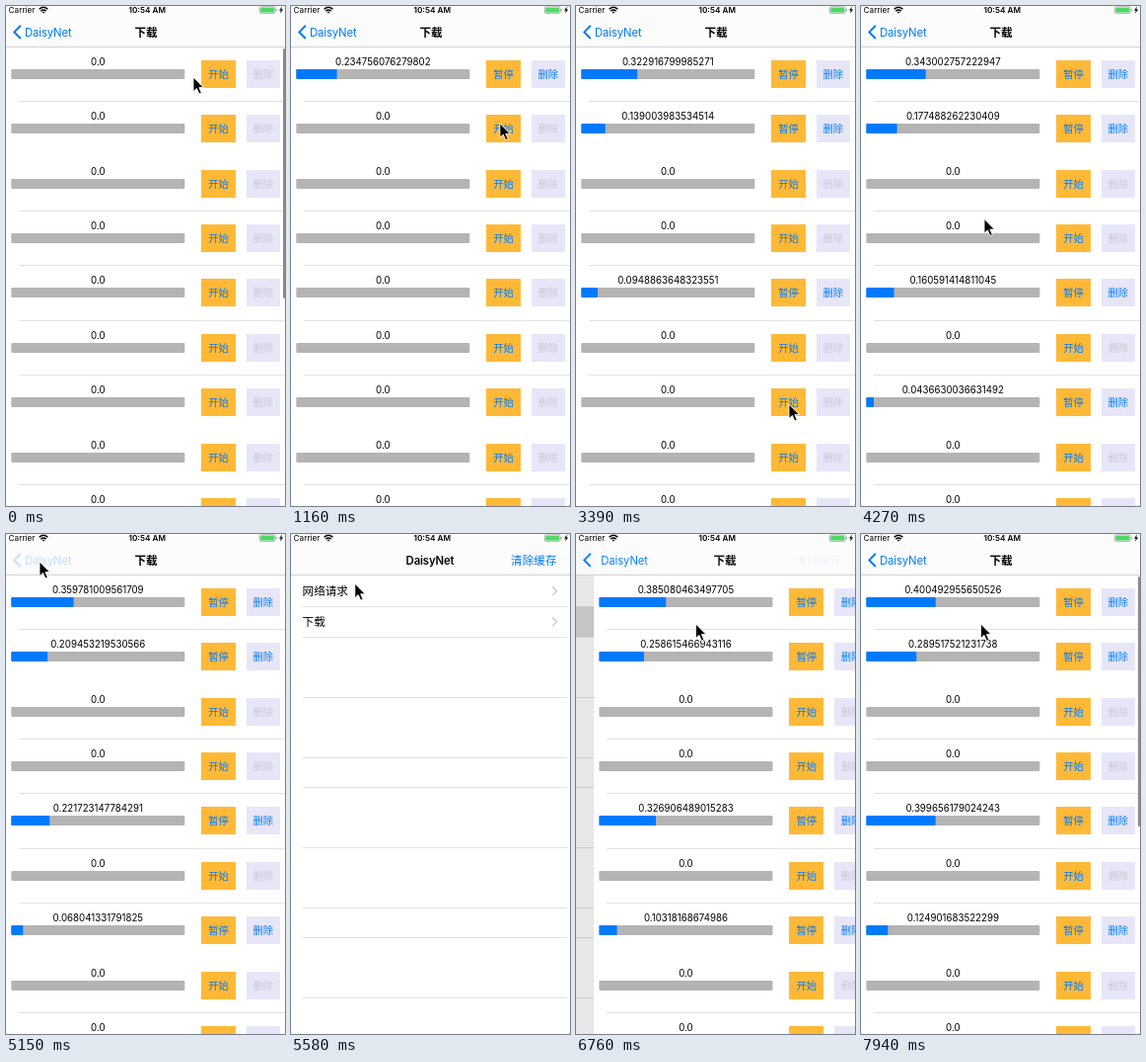
Recreate the animation shown at these times as an HTML page. Size 283 px wide and 506 px high, loop 8 s.

```html
<!DOCTYPE html>
<html lang="zh-CN">
<head>
<meta charset="utf-8">
<title>下载</title>
<style>
html, body { margin: 0; width: 100%; height: 100%; overflow: hidden; background: #fff; }
svg { display: block; width: 100vw; height: 100vh; }
text { font-family: Inter, "Noto Sans CJK SC", "Noto Sans CJK", sans-serif; font-size: 11.6px; fill: #000; white-space: pre; }
.mid { text-anchor: middle; }
.bold { font-weight: 600; }
.latin { font-size: 11.3px; letter-spacing: -.1px; }
.status { font-size: 8.2px; }
.value { font-size: 9.7px; }
.btn { font-size: 10.3px; }
.blue { fill: #007aff; }
.crisp { shape-rendering: crispEdges; }
.line { fill: #e2e2e3; shape-rendering: crispEdges; }
.arrow { fill: none; stroke: #c7c7cc; stroke-width: 1.3; }
</style>
</head>
<body>
<svg viewBox="0 0 283 506">
  <g id="home">
    <rect width="283" height="506" fill="#fff"/>
    <rect id="pressed" y="74" width="283" height="30.3" fill="#d9d9d9"/>
    <g id="homeLines"></g>
    <text x="12.4" y="62.3">网络请求</text>
    <text x="12.4" y="93.3">下载</text>
    <path class="arrow" d="M266 53.5l4.3 4.3-4.3 4.3M266 84.5l4.3 4.3-4.3 4.3"/>
    <rect id="dim" width="283" height="506"/>
  </g>
  <g id="page">
    <rect width="283" height="506" fill="#fff"/>
    <g id="rows"></g>
    <rect id="scroll" x="281" y="43" width="2" height="253" rx="1" fill="#8c8c8f"/>
  </g>
  <g id="nav">
    <rect width="283" height="41" fill="#fcfcfc" fill-opacity=".88"/>
    <rect class="line" y="41" width="283" height="1" style="fill:#d3d3d4"/>
    <text class="status" x="2.6" y="7">Carrier</text>
    <g fill="none" stroke="#000" stroke-width="1.5">
      <path d="M33.6 3.3q4.4-4 8.8 0M35.3 5.1q2.7-2.3 5.4 0"/>
      <path d="M37 6.2h2L38 7.3z" stroke-width=".8"/>
    </g>
    <text class="status bold mid" x="143.2" y="7">10:54 AM</text>
    <rect x="257.4" y=".9" width="15.8" height="6.4" rx="1.4" fill="none" stroke="#8a8a8a" stroke-width=".7"/>
    <rect x="258.3" y="1.8" width="14" height="4.6" rx=".7" fill="#4cd964"/>
    <path d="M274.1 3v2.2q1-.3 1-1.1t-1-1.1z" fill="#8a8a8a"/>
    <path d="M280 .6l-3 4h1.8l-.8 3 3.2-4.2h-1.9z"/>
    <g id="back">
      <path d="M14.8 19.8l-6.4 6.6 6.4 6.6" fill="none" stroke="#007aff" stroke-width="2"/>
      <text id="backLabel" class="latin blue" y="30.5">DaisyNet</text>
    </g>
    <text id="homeTitle" class="latin bold mid" y="30.5">DaisyNet</text>
    <text id="pageTitle" class="bold mid" y="30.8">下载</text>
    <text id="clear" class="blue" x="223.1" y="30.8">清除缓存</text>
  </g>
  <path id="cursor" d="M0 0V14.6l3.4-3.2 2.5 5.6 2.4-1-2.4-5.4h4.6z" stroke="#fff" stroke-width=".9"/>
</svg>
<script>
const LOOP = 8000, STEP = 146.6, LAST = 54;  // times below count steps
const BACK = 35, OPEN = 44;
const BAR = 176, PITCH = 55.37;
const $ = id => document.getElementById(id);

function add(parent, tag, attrs, text) {
  const el = document.createElementNS('http://www.w3.org/2000/svg', tag);
  for (const k in attrs) el.setAttribute(k, attrs[k]);
  if (text) el.textContent = text;
  return parent.appendChild(el);
}

// Running downloads by row: tap time, final share, slowdown exponent
const downloads = {
  0: { start: 3, end: 0.400492955650526, pow: .23 },
  1: { start: 13, end: 0.289517521231738, pow: .52 },
  4: { start: 16, end: 0.399656179024243, pow: .85 },
  6: { start: 23, end: 0.124901683522299, pow: .64 }
};

// Pointer stops, each reached between two times
const stops = [
  { from: 0, to: 3, x: 211, y: 73 },
  { from: 4, to: 9, x: 212, y: 124 },
  { from: 11, to: 15, x: 212, y: 288 },
  { from: 18, to: 22, x: 216, y: 403 },
  { from: 25, to: 33, x: 34, y: 28 },
  { from: 36, to: 41, x: 121.5, y: 91 }
];

function pointer(n) {
  let x = 190, y = 72;
  for (const s of stops) {
    const u = Math.min(1, Math.max(0, (n - s.from) / (s.to - s.from)));
    const e = u * u * (3 - 2 * u);
    x += (s.x - x) * e;
    y += (s.y - y) * e;
  }
  return [x, y];
}

// Critically damped spring from 1 to 0
function spring(n) {
  const k = 2.22 * Math.max(0, n);
  return (1 + k) * Math.exp(-k);
}

function hairline(parent, y) {
  add(parent, 'rect', { class: 'line', x: 12.5, y: Math.floor(y), width: 271, height: 1 });
}

// Some hairlines vanish at this scale, in a cycle of five
for (let k = 1; k < 15; k++) if (2 * k % 5 > 1) hairline($('homeLines'), 43.5 + 30.42 * k);
for (let k = 1; k < 9; k++) if (k % 5 !== 2) hairline($('rows'), 41.5 + PITCH * k);

const rows = Array.from({ length: 9 }, (_, i) => {
  const g = add($('rows'), 'g', { transform: `translate(0 ${Math.round(PITCH * i)})` });
  const value = add(g, 'text', { class: 'value mid', x: 93.3, y: 60.1 });
  add(g, 'rect', { x: 5.3, y: 64, width: BAR, height: 10, rx: 1.2, fill: '#b4b4b4' });
  const fill = add(g, 'rect', { class: 'blue', x: 5.3, y: 64, height: 10, rx: 1 });
  add(g, 'rect', { class: 'crisp', x: 198, y: 55, width: 35, height: 28, fill: '#ffb937' });
  const start = add(g, 'text', { class: 'btn mid blue', x: 215.6, y: 73 });
  add(g, 'rect', { class: 'crisp', x: 244, y: 55, width: 34, height: 28, fill: '#e7e6f9' });
  const remove = add(g, 'text', { class: 'btn mid', x: 260.8, y: 73 }, '删除');
  return { value, fill, start, remove, job: downloads[i] };
});

const move = (id, x, y = 0) => $(id).setAttribute('transform', `translate(${x} ${y})`);
const fade = (id, a) => $(id).setAttribute('opacity', a);

function drawRow({ value, fill, start, remove, job }, n) {
  const on = job && n > job.start;
  const v = on ? job.end * ((n - job.start) / (LAST - job.start)) ** job.pow : 0;
  value.textContent = on ? String(Number(v.toPrecision(15))) : '0.0';
  fill.setAttribute('width', v * BAR);
  start.textContent = on ? '暂停' : '开始';
  remove.style.fill = on ? '#007aff' : '#c9c9d2';
}

function draw(n) {
  rows.forEach(row => drawRow(row, n));

  // p: 0 on the download page, 1 on the home page
  const p = n < OPEN ? 1 - spring(n - BACK) : spring(n - OPEN);
  const q = 1 - p;
  move('page', 283 * p);
  move('home', -85 * q);
  fade('dim', .1 * q);
  fade('pressed', n >= OPEN ? 1 : q);
  fade('scroll', n < 2 || n > OPEN ? 1 : 0);

  const held = n === BACK || n === BACK - 1;
  fade('back', q * (held ? .22 : 1));
  move('backLabel', 19 + 98 * p);
  move('homeTitle', 142 - 98 * q);
  fade('homeTitle', p < .1 ? 0 : p);
  move('pageTitle', 142 + 141 * p);
  fade('pageTitle', q);
  fade('clear', p);
  move('cursor', ...pointer(n));
}

// The screen refreshes in coarse steps
function tick() {
  const t = performance.now() % LOOP;
  draw(Math.min(LAST, Math.floor((t + 20) / STEP)));
  requestAnimationFrame(tick);
}
tick();
</script>
</body>
</html>
```
